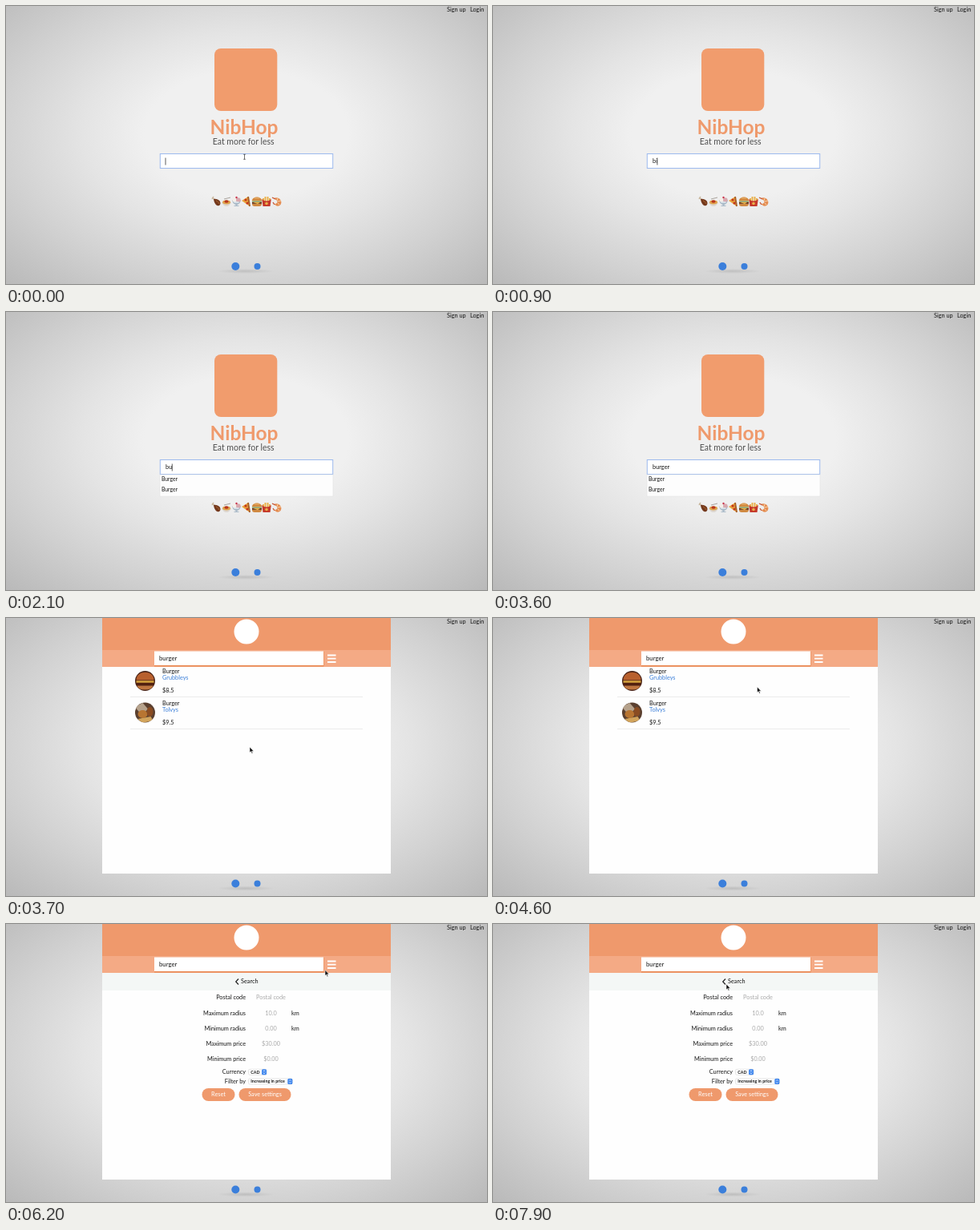
These frames come from a looping animation (600x347 px, 8 s). An HTML page:

```html
<!DOCTYPE html>
<html lang="en">
<head>
<meta charset="utf-8">
<title>Food search</title>
<style>
html, body { margin: 0; width: 100%; height: 100%; overflow: hidden; }
svg { display: block; width: 100vw; height: 100vh;
  background: radial-gradient(ellipse farthest-corner at 50% 46%, #f0f0f0 30%, #e4e4e4 48%, #d1d1d1 72%, #b9b9b9 100%); }
text { font: 7.3px Lato, "Open Sans", sans-serif; fill: #151515; }
.name { font-size: 24.5px; font-weight: 700; fill: #ef9a6c; }
.mid { text-anchor: middle; }
.end { text-anchor: end; }
.hint { fill: #a9a9a9; }
.link { fill: #3b7fd9; }
.white { fill: #fff; }
.small { font-size: 5.3px; font-weight: 700; }
.item { font-size: 6.8px; }
</style>
</head>
<body>
<svg viewBox="0 0 600 347">
  <defs>
    <clipPath id="round"><circle r="12.5"/></clipPath>
    <radialGradient id="shade"><stop stop-color="#888" stop-opacity=".3"/><stop offset="1" stop-color="#888" stop-opacity="0"/></radialGradient>
  </defs>
  <text x="550" y="7">Sign up</text>
  <text x="579" y="7">Login</text>

  <g id="social">
    <ellipse cx="299" cy="331" rx="36" ry="3" fill="url(#shade)"/>
    <circle cx="286.3" cy="325" r="5" fill="#3b7fdb"/>
    <circle cx="313.5" cy="325" r="4" fill="#3b7fdb"/>
  </g>

  <g id="home">
    <rect x="260" y="53" width="78.3" height="78" rx="8" fill="#f19c6d"/>
    <text class="name mid" x="297" y="160">NibHop</text>
    <text class="mid" x="296.2" y="173" style="font-size:10.5px;fill:#505050">Eat more for less</text>
    <g id="foods">
      <g transform="translate(262 244)">
        <path d="M-5-5L0-1M-5-3L-3-6" stroke="#c9b8a0" stroke-width="1.4"/>
        <path d="M-3-3C3-4 7 1 5 4S-2 5-3-3Z" fill="#74391d"/>
        <path d="M0-1Q3 0 4 3" fill="none" stroke="#a9642f"/>
      </g>
      <g transform="translate(275 244)">
        <path d="M-6 1H6Q4 6 0 6T-6 1Z" fill="#dcd6cf"/>
        <ellipse cy="1" rx="5" ry="2.4" fill="#dfa34b"/>
        <ellipse cy="0" rx="2.6" ry="1.7" fill="#b8361f"/>
        <path d="M-3-3L5-5" stroke="#a8a29c"/>
      </g>
      <g transform="translate(287.5 244)">
        <path d="M-5.5-2H5.5Q5 3 1 4V5H3V6H-3V5H-1V4Q-5 3-5.5-2Z" fill="#a9bac8"/>
        <circle cx="-2.3" cy="-2" r="2.8" fill="#f5efe9"/><circle cx="2.3" cy="-2" r="2.8" fill="#d9a9b0"/>
        <path d="M-3 1H3" stroke="#e4ebf0" stroke-width="1.5"/>
        <circle cy="-5" r="1.2" fill="#c8324a"/>
      </g>
      <g transform="translate(299 244)">
        <path d="M-5-1L3-6 5 6Z" fill="#e9a43c"/>
        <path d="M3-6L5 6" stroke="#a8602a" stroke-width="2"/>
        <circle cx="0" cy="-2" r="1.6" fill="#c5351f"/><circle cx="2" cy="2" r="1.5" fill="#c5351f"/>
      </g>
      <g transform="translate(313 244)">
        <path d="M-6-1C-6-7 6-7 6-1Z" fill="#d2893f"/>
        <path d="M-3-4H3" stroke="#eab772"/>
        <path d="M-6 0H6" stroke="#7ba047" stroke-width="1.2"/>
        <path d="M-6 1.8H6" stroke="#6b351e" stroke-width="2.2"/>
        <path d="M-5 1H4L1 3Z" fill="#f0bd48"/>
        <path d="M-6 3H6Q6 6 3 6H-3Q-6 6-6 3Z" fill="#d08a42"/>
      </g>
      <g transform="translate(325 244)">
        <path d="M-4-1V-4M-1.5 0V-6M1.5 0V-6M4-1V-4" stroke="#e9b04a" stroke-width="2"/>
        <path d="M-5.8-3Q0 2 5.8-3L4.5 6H-4.5Z" fill="#c5392b"/>
        <circle cy="2.5" r="1.8" fill="#e9b04a"/>
      </g>
      <g transform="translate(338 244)">
        <path d="M-4-4C2-7 7-1 5 3S-2 6-3 3Q2 2 0-1Z" fill="#e58e53"/>
        <path d="M1-4L0-1M5-1L1 0M3 4L1 2" stroke="#f6d3ae"/>
        <path d="M-6-5L-2-3M-5 1L-3 4" stroke="#c6512f" stroke-width="1.3"/>
      </g>
    </g>
    <rect x="192.3" y="184.5" width="215.4" height="18" fill="#fff" stroke="#9dbaee"/>
    <text id="typed" x="199" y="196" style="font-size:7.4px"></text>
    <path id="caret" d="M0 189.5V198.5" stroke="#333" stroke-width=".8"/>
    <g id="options">
      <rect x="192" y="203" width="216" height="27" fill="#fdfdfd" stroke="#ddd" stroke-width=".5"/>
      <text class="item" x="194" y="210.6">Burger</text>
      <text class="item" x="194" y="224">Burger</text>
    </g>
    <path id="beam" d="M296.2 185.3H298.8M297.5 185.3V191.3M296.2 191.3H298.8" fill="none" stroke="#333" stroke-width=".7"/>
  </g>

  <g id="panel">
    <rect x="120" width="360" height="319" fill="#fefefe"/>
    <rect x="120" width="360" height="40" fill="#ef996c"/>
    <rect x="120" y="40" width="360" height="21" fill="#f4aa85"/>
    <circle cx="300" cy="17" r="15.5" fill="#fff"/>
    <rect x="185" y="42" width="211.5" height="18.5" fill="#e98a55"/>
    <rect x="185" y="41.5" width="211" height="17.5" fill="#fff"/>
    <text x="191" y="52.7" style="font-size:7.8px">burger</text>
    <path d="M401 46.5H411.5M401 50.7H411.5M401 55H411.5" stroke="#fff" stroke-width="1.8"/>
  </g>

  <g id="results">
    <g transform="translate(173.5 78.5)" clip-path="url(#round)">
      <rect x="-13" y="-13" width="26" height="26" fill="#4a2519"/>
      <path d="M-11-1C-11-14 11-14 11-1Z" fill="#b8602e"/>
      <path d="M-11 1H11" stroke="#d9a53c" stroke-width="2.5"/>
      <path d="M-11 4H11" stroke="#53200f" stroke-width="3"/>
      <path d="M-10 6H10Q9 11 0 11T-10 6Z" fill="#bf7640"/>
    </g>
    <g transform="translate(173.5 118)" clip-path="url(#round)">
      <rect x="-13" y="-13" width="26" height="26" fill="#5b4030"/>
      <path d="M-13-7L-3-12 4-4-5 2Z" fill="#b6a28c"/>
      <ellipse cx="-3" cy="2" rx="6" ry="5" fill="#b87532"/>
      <ellipse cx="6" cy="-1" rx="4" ry="6" fill="#8a4c22"/>
      <path d="M-9 8L7 5 10 10-4 13Z" fill="#d2a45c"/>
    </g>
    <text x="195" y="69.4">Burger</text>
    <text class="link" x="195" y="77.3">Grubbleys</text>
    <text x="195" y="93.3">$8.5</text>
    <text x="195" y="109.4">Burger</text>
    <text class="link" x="195" y="117.3">Tolvys</text>
    <text x="195" y="133.3">$9.5</text>
    <path d="M155 98.5H445M155 138.5H445" stroke="#ebebeb"/>
  </g>

  <g id="settings">
    <rect x="120" y="61" width="360" height="22" fill="#f4f7f6"/>
    <path d="M290 68.5L286.7 72 290 75.5" fill="none" stroke="#222" stroke-width="1.2"/>
    <text x="293" y="74.4">Search</text>
    <g id="fields"></g>
    <text class="end" x="299" y="186.6">Currency</text>
    <text class="end" x="299" y="198.6">Filter by</text>
    <g id="selects"></g>
    <rect x="244.5" y="205" width="41" height="16" rx="8" fill="#ef996c"/>
    <rect x="290.5" y="205" width="65" height="16" rx="8" fill="#ef996c"/>
    <text class="white mid" x="265" y="215.2">Reset</text>
    <text class="white mid" x="323" y="215.2">Save settings</text>
  </g>

  <path id="pointer" d="M0 0V7L1.6 5.6 2.7 8.2 3.8 7.7 2.7 5.2H5Z" fill="#111" stroke="#fff" stroke-width=".5"/>
</svg>
<script>
const $ = id => document.getElementById(id);
const LOOP = 8000, RESULTS_AT = 3700, SETTINGS_AT = 5400;

// [time, text in the search box]
const keys = [[0, ''], [400, 'b'], [700, 'bi'], [1300, 'b'], [1800, 'bu'],
  [2400, 'bur'], [2600, 'burg'], [2800, 'burge'], [3000, 'burger']];

// [time, x, y] of the pointer tip
const route = [[3700, 304, 161], [4000, 304, 161], [4200, 309, 147], [4300, 309, 147], [4600, 329.5, 86],
  [4900, 376, 62], [5000, 376, 62], [5300, 404, 51], [5700, 398, 57.5], [6200, 398, 57.5],
  [7000, 297, 125], [7200, 296.5, 124], [7800, 291, 75], [8000, 291, 75]];

const rows = [['Postal code', 'Postal code', ''], ['Maximum radius', '10.0', 'km'],
  ['Minimum radius', '0.00', 'km'], ['Maximum price', '$30.00', ''], ['Minimum price', '$0.00', '']];
$('fields').innerHTML = rows.map(([label, hint, unit], i) => {
  const y = 94.3 + i * 19.2;
  return `<text class="end" x="299" y="${y}">${label}</text>
    <text class="hint mid" x="330.5" y="${y}">${hint}</text><text x="356" y="${y}">${unit}</text>`;
}).join('');

const select = (y, right, label) => `
  <rect x="302.5" y="${y}" width="${right - 302.5}" height="7" rx="1.5" fill="#fff" stroke="#ccc" stroke-width=".5"/>
  <rect x="${right - 6}" y="${y}" width="6" height="7" rx="1.5" fill="#3f86ee"/>
  <path d="M${right - 4.3} ${y + 2.8}l1.3 -1.4 1.3 1.4m0 1.4l-1.3 1.4 -1.3 -1.4" fill="none" stroke="#fff" stroke-width=".7"/>
  <text class="small" x="305.3" y="${y + 5.4}">${label}</text>`;
$('selects').innerHTML = select(181.3, 325, 'CAD') + select(193, 357.3, 'Increasing in price');

const show = (id, on) => $(id).style.display = on ? '' : 'none';

function pointerAt(t) {
  const i = Math.max(1, route.findIndex(p => p[0] >= t));
  const [t0, x0, y0] = route[i - 1], [t1, x1, y1] = route[i];
  const k = Math.max(0, (t - t0) / (t1 - t0));
  const e = k * k * (3 - 2 * k);
  return [x0 + (x1 - x0) * e, y0 + (y1 - y0) * e];
}

function draw(t) {
  const home = t < RESULTS_AT;
  show('home', home);
  show('panel', !home);
  show('results', !home && t < SETTINGS_AT);
  show('settings', t >= SETTINGS_AT);
  show('pointer', !home);
  $('social').setAttribute('transform', `translate(0 ${home ? 0 : 6.5})`);
  if (home) {
    const [since, text] = keys.filter(k => k[0] <= t).pop();
    $('typed').textContent = text;
    show('options', text === 'b' || text.startsWith('bu'));
    show('beam', !text);
    show('caret', (t - since) % 1000 < 550);
    const x = 199 + (text ? $('typed').getComputedTextLength() : 0);
    $('caret').setAttribute('transform', `translate(${x} 0)`);
  } else {
    $('pointer').setAttribute('transform', `translate(${pointerAt(t)})`);
  }
}

function tick() {
  draw(Math.floor(performance.now() % LOOP / 100) * 100);
  requestAnimationFrame(tick);
}
tick();
</script>
</body>
</html>
```
